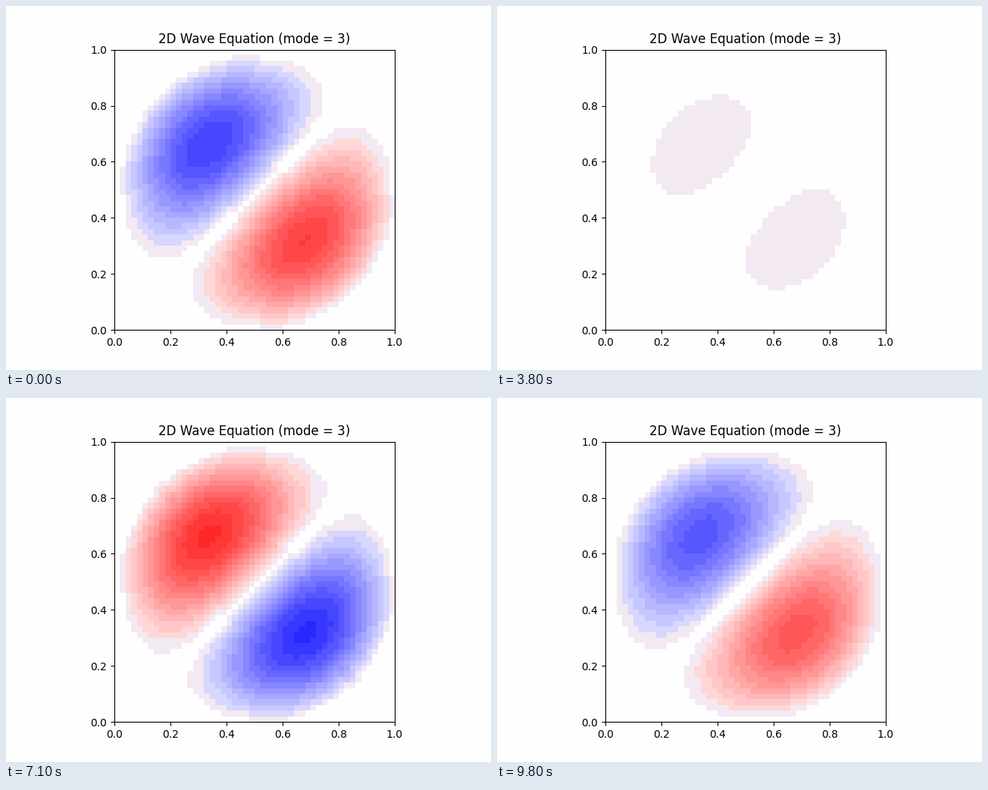
These frames come from a looping animation (640 px wide and 480 px high, 9.9 s). A matplotlib script:

```python
import numpy as np
import matplotlib.pyplot as plt
from matplotlib.animation import FuncAnimation

N = 50            # grid cells per side
FRAMES = 99
PERIOD = 100      # frames per oscillation
PEAK = 11.5       # frame position of the largest displacement
LEVELS = 16       # colour steps from white to full colour
PAPER = 254 / 255


def membrane_mode():
    """Diagonal two-lobed mode of a circular membrane on the grid."""
    points = np.argwhere(np.ones((N, N))) - N // 2
    points = points[(points ** 2).sum(axis=1) <= (N // 2) ** 2]
    gaps = np.abs(points[:, None] - points[None]).sum(axis=-1)
    laplacian = 4.0 * np.eye(len(points)) - (gaps == 1)

    # Shifted inverse iteration close to the wanted eigenvalue
    shift = (3.8317 / 25.3) ** 2
    inverse = np.linalg.inv(laplacian - shift * np.eye(len(points)))
    start = points.sum(axis=1).astype(float)
    vec = start
    for _ in range(8):
        vec = inverse @ vec
        vec /= np.abs(vec).max()
    vec *= np.sign(vec @ start)

    grid = np.zeros((N, N))
    rows, cols = (points + N // 2).T
    grid[rows, cols] = vec
    return grid


def colours(u):
    """Stepped blue-white-red image of the displacement."""
    level = np.minimum((np.abs(u) * LEVELS).astype(int), LEVELS - 1)
    fade = (16 * (LEVELS - 1 - level) + 7) / 255
    rgb = np.ones((N, N, 3))
    rgb[..., 1] = fade
    rgb[..., 0] = np.where(u < 0, fade, 1)
    rgb[..., 2] = np.where(u < 0, 1, fade)
    rgb[level == 0] = PAPER
    rgb[level == 1] = np.array([243, 233, 243]) / 255
    return rgb


mode = membrane_mode()

fig, ax = plt.subplots(figsize=(6.4, 4.8), dpi=100, facecolor=(PAPER,) * 3)
plt.rcParams["font.family"] = "DejaVu Sans"
image = ax.imshow(colours(0 * mode), extent=(0, 1, 0, 1),
                  interpolation="nearest")
ax.set_title("2D Wave Equation (mode = 3)")


def draw(i):
    swing = np.cos(2 * np.pi * (i - PEAK) / PERIOD)
    image.set_data(colours(swing * mode))
    return [image]


anim = FuncAnimation(fig, draw, frames=FRAMES, interval=100, repeat=True)
plt.show()
```
